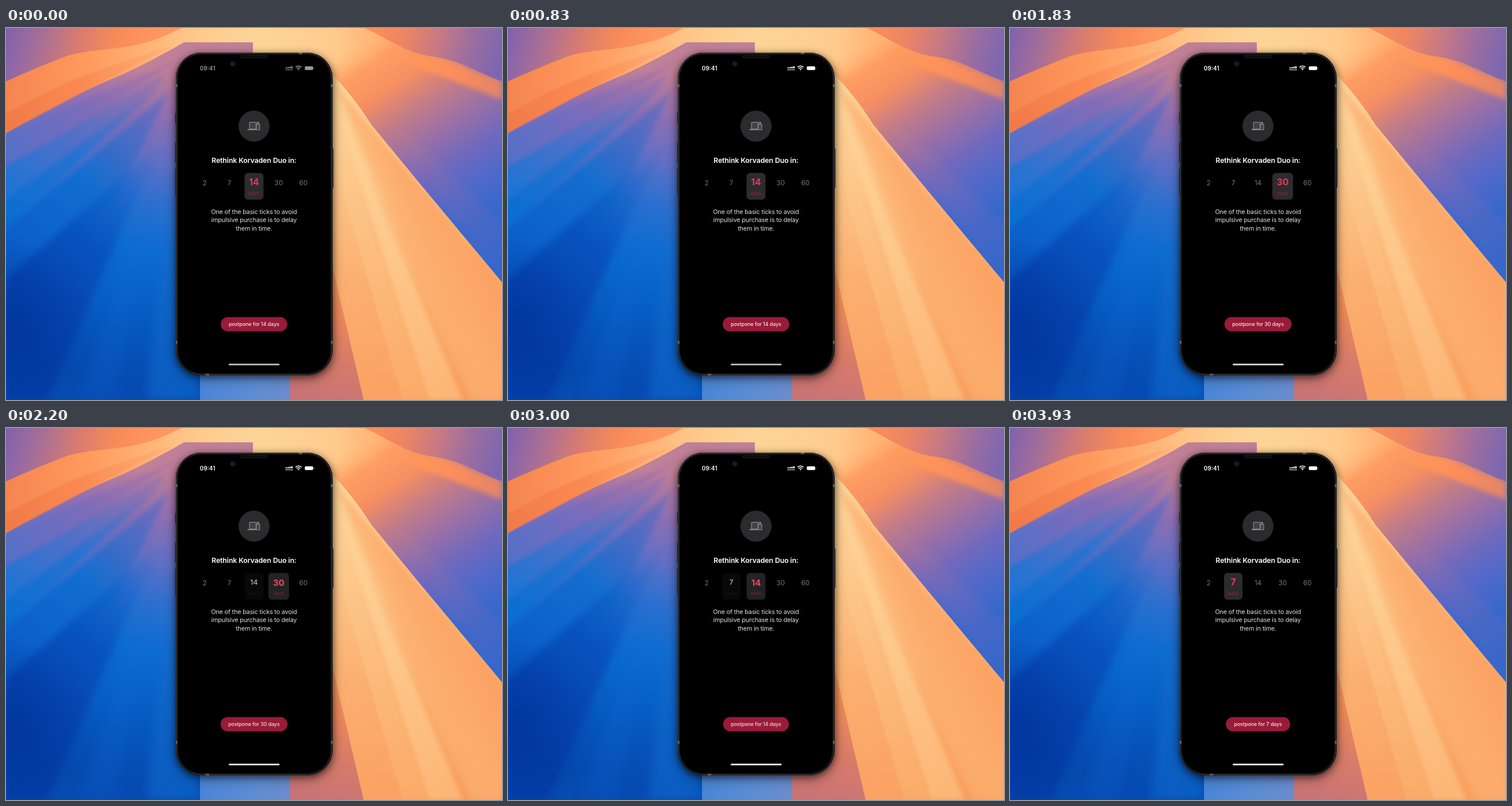
Recreate the animation shown at these times as an HTML page with a canvas. Size 864 by 648 pixels, loop 3960 ms.

```html
<!DOCTYPE html>
<html lang="en">
<head>
<meta charset="utf-8">
<title>Postpone picker</title>
<style>
html, body { margin: 0; width: 100%; height: 100%; overflow: hidden; background: #1560cc; }
canvas, svg { position: absolute; left: 0; top: 0; width: 864px; height: 648px; display: block; }
.phone { position: absolute; left: 296px; top: 43px; width: 272.5px; height: 562px; border-radius: 44px;
  background: #000; box-shadow: 0 3px 12px 1px rgba(0,0,0,.5), 0 8px 22px rgba(0,0,0,.25); }
text { font-family: Inter, Roboto, sans-serif; text-anchor: middle; }
</style>
</head>
<body>
<canvas id="wall" width="864" height="648"></canvas>
<div class="phone"></div>
<svg viewBox="0 0 864 648">
  <g fill="none">
    <rect x="296.5" y="43.5" width="271.5" height="561" rx="43.5" stroke="#111214" stroke-width="1"/>
    <rect x="297.4" y="44.4" width="269.7" height="559.2" rx="42.6" stroke="#56585a" stroke-width=".9"/>
    <rect x="299.4" y="46.4" width="265.7" height="555.2" rx="40.6" stroke="#161718" stroke-width="1"/>
  </g>
  <g fill="#2b2d38">
    <rect x="294.4" y="148" width="1.6" height="18"/><rect x="294.4" y="199" width="1.6" height="35"/>
    <rect x="294.4" y="245" width="1.6" height="46"/><rect x="568.5" y="210" width="2" height="68"/>
  </g>
  <g fill="#66686b">
    <rect x="296" y="98" width="2.5" height="5"/><rect x="566" y="98" width="2.5" height="5"/>
    <rect x="296" y="545" width="2.5" height="5"/><rect x="566" y="545" width="2.5" height="5"/>
    <rect x="510" y="43" width="6" height="2.4"/><rect x="348" y="602.4" width="6" height="2.4"/>
  </g>
  <rect x="408" y="48.2" width="48" height="3.6" rx="1.8" fill="#0a0a0b" stroke="#292a2c" stroke-width=".8"/>
  <circle cx="395" cy="62.5" r="4.6" fill="#17181c"/>
  <circle cx="394.5" cy="62.5" r="2.3" fill="#10121b" stroke="#2b3041" stroke-width=".9"/>

  <g id="status" fill="#fff">
    <text x="351" y="73.6" font-size="10" font-weight="600">09:41</text>
    <g id="signal"></g>
    <g fill="none" stroke="#fff" stroke-width="1.5">
      <path d="M504.3 68.3a7.4 7.4 0 0 1 10.4 0M506.3 70.5a4.5 4.5 0 0 1 6.4 0"/>
    </g>
    <path d="M507.9 72l1.6 1.9 1.6-1.9a2.3 2.3 0 0 0-3.2 0z"/>
    <rect x="520.5" y="66.7" width="14.5" height="6.6" rx="1.8"/>
    <rect x="536" y="68.8" width="1" height="2.4" rx=".5" opacity=".6"/>
  </g>

  <circle cx="432" cy="171" r="27" fill="#2b2b2d"/>
  <g fill="#434345" stroke="#8c8c8f" stroke-width="1.2">
    <path d="M424.2 176V165q0-.6.6-.6h15.4v2.8H435.6V176z"/>
    <path d="M420.8 177h14.4" stroke-width="1.9"/>
    <rect x="436" y="167.6" width="6" height="9.9" rx=".9"/>
  </g>

  <text x="432" y="235.3" font-size="12.4" font-weight="600" letter-spacing="-.14" fill="#fff">Rethink Korvaden Duo in:</text>
  <g id="picker"></g>
  <g font-size="10.9" letter-spacing="-.2" fill="#dededf">
    <text x="432" y="323.9">One of the basic ticks to avoid</text>
    <text x="432" y="338.4">impulsive purchase is to delay</text>
    <text x="432" y="352.9">them in time.</text>
  </g>
  <rect id="button" y="503.5" height="25" rx="12.5" fill="#981b39"/>
  <g id="labels" font-size="9.1" font-weight="500" letter-spacing="-.15" fill="#f3dfe4"></g>
  <rect id="home" x="388" y="584.8" width="88.5" height="2.8" rx="1.4" fill="#fff"/>
</svg>
<script>
const $ = id => document.getElementById(id);
const clamp = v => Math.max(0, Math.min(1, v));
const mix = (a, b, p) => a + (b - a) * p;

// Wallpaper: gradient-filled rays
const ctx = $('wall').getContext('2d');
function ray(path, [x1, y1, x2, y2], colors, blur = 0) {
  const g = ctx.createLinearGradient(x1, y1, x2, y2);
  colors.forEach((c, i) => g.addColorStop(i / (colors.length - 1), c));
  ctx.filter = blur ? `blur(${blur}px)` : 'none';
  ctx.fillStyle = g;
  ctx.fill(new Path2D(path));
}
function glow(x, y, r, color) {
  const g = ctx.createRadialGradient(x, y, 0, x, y, r);
  g.addColorStop(0, color);
  g.addColorStop(1, color.slice(0, 7) + '00');
  ctx.filter = 'none';
  ctx.fillStyle = g;
  ctx.fillRect(x - r, y - r, 2 * r, 2 * r);
}
function paintWall() {
  // top glow and the two orange wings
  ray('M0 0H864V648H0Z', [0, 0, 864, 0], ['#f4854f', '#ff9a5e', '#ffbd80', '#fdd294', '#ffc88a', '#ff985a', '#f98a55']);
  glow(440, 0, 170, '#fdd698b0');

  // left blue field
  ctx.save();
  ctx.clip(new Path2D('M0 183C70 139 140 107 205 80Q258 55 310 25H430V648H0Z'));
  ray('M0 0H430V648H0Z', [250, 75, 140, 600],
    ['#c08098', '#8d6fb4', '#5f70c6', '#2a70d0', '#0d6cd0', '#0762c8', '#0655bb', '#064bb0']);
  ray('M300 55L0 186V243L120 178Z', [0, 220, 280, 70], ['#5570c8', '#7d6cba', '#b4769f'], 3);
  ray('M285 75L0 243V300L170 205Z', [0, 270, 280, 80], ['#1f74d4', '#5c70c4', '#a874a8'], 3);
  ray('M280 90L0 300V350Z', [0, 320, 270, 110], ['#0a6fd0', '#2a72d0', '#8b6eb4'], 4);
  ray('M285 110L0 350V437L190 300Z', [0, 400, 270, 130], ['#0a5dc6', '#126dd0', '#746cba'], 4);
  ray('M270 200L0 437V648H70Z', [0, 520, 270, 220], ['#053ea7', '#0852bd', '#126bcf00'], 6);
  ray('M275 190L190 648H130Z', [0, 200, 0, 648], ['#1a70d400', '#0e6bd050', '#0a5bc450'], 8);
  ray('M300 140L338 648H245Z', [0, 140, 0, 648], ['#6a6bb800', '#206cca60', '#0d69cea0'], 8);
  glow(0, 520, 160, '#00309aa0');
  ctx.restore();

  // upper left corner and lower edge of the wing
  ray('M0 0H306Q278 14 255 22C195 40 150 36 108 48Q50 70 0 93Z', [0, 10, 245, 70],
    ['#8062ae', '#a96f95', '#d97c70', '#f88b58', '#ff9760']);
  ray('M0 150Q70 108 150 78T290 32Q180 86 0 183Z', [0, 160, 270, 45], ['#f17b48', '#fb8a51', '#ffad73'], 1);

  // right violet field
  ctx.save();
  ctx.clip(new Path2D('M864 93C815 75 790 56 745 50C695 44 665 18 625 0H540V180L864 500Z'));
  ray('M540 0H864V500H540Z', [585, 30, 800, 350],
    ['#ffcb8c00', '#ff9f62', '#f58e62', '#c27c88', '#9a70a6', '#7069be', '#4f69ca', '#3768cc']);
  ray('M640 20Q700 50 745 50L864 93V125Q750 80 640 40Z', [650, 30, 864, 110], ['#ff9b5d00', '#ff955b', '#f98d5b', '#e08468'], 4);
  ray('M600 85L864 340V443Z', [640, 160, 864, 400], ['#e1887300', '#8c6bad40', '#3966cb90'], 6);
  ctx.restore();

  // upper right corner
  ray('M625 0H864V93C815 75 790 56 745 50C695 44 665 18 625 0Z', [635, 0, 860, 60],
    ['#fb9059', '#ef8562', '#c97a82', '#9d6e9f', '#7c66b2']);

  // lower right beam
  ctx.save();
  ctx.clip(new Path2D('M548 60Q600 110 636 168L720 270L864 443V648H495V590H555Z'));
  ray('M480 50H864V648H480Z', [580, 90, 760, 648], ['#fdd498', '#fdca8e', '#fcb97b', '#fcac6b', '#f99f5e']);
  ray('M574 100L864 443V648H810Z', [640, 400, 820, 320], ['#fcb57600', '#fbac6d', '#fc9f60'], 5);
  ray('M570 115L795 648H735Z', [570, 140, 760, 648], ['#fdd598', '#fdc88b', '#fcb676'], 4);
  ray('M568 150L735 648H690L568 250Z', [570, 150, 700, 648], ['#fdd295', '#fcbc7e', '#fbab69'], 3);
  ray('M565 370L623 648H495V560Z', [590, 400, 530, 648], ['#f9a066', '#ef8b59', '#d87c68', '#c97377']);
  ray('M566 210L690 648H623L565 400Z', [570, 240, 650, 648], ['#fdc98b', '#fbaf70', '#fba163']);
  ctx.restore();

  // strip under the phone
  ray('M338 590H495V648H338Z', [338, 0, 495, 0], ['#4886d6', '#5a8cd5', '#6b8ccd']);
}
paintWall();

// Screen content
function add(parent, tag, attrs, label) {
  const el = document.createElementNS('http://www.w3.org/2000/svg', tag);
  for (const k in attrs) el.setAttribute(k, attrs[k]);
  if (label) el.textContent = label;
  return parent.appendChild(el);
}
for (let i = 0; i < 4; i++) {
  const x = 487 + i * 3.3, h = 2 + i * .7;
  add($('signal'), 'rect', { x, y: 70.6 - h, width: 2.3, height: h, rx: .5 });
  add($('signal'), 'rect', { x, y: 71.9, width: 2.3, height: 1.6, rx: .5 });
}

const options = [[2, 32], [7, 32], [14, 33], [30, 36], [60, 36]].map(([days, width], i) => {
  const x = 346 + i * 43, g = $('picker');
  return {
    box: add(g, 'rect', { x: x - width / 2, y: 252.5, width, height: 46.5, rx: 6, fill: '#2c2c2e' }),
    unit: add(g, 'text', { x, y: 291.2, 'font-size': 6.4, 'letter-spacing': .25, fill: '#b8203f' }, 'DAYS'),
    num: add(g, 'text', { x }, days),
    label: add($('labels'), 'text', { x: 432, y: 519.2 }, `postpone for ${days} days`),
    wide: { 7: 112, 14: 116, 30: 117 }[days] || 112
  };
});

const tones = [[0, 119, 119, 123], [.2, 190, 178, 184], [.55, 224, 126, 136], [.8, 230, 75, 95], [1, 240, 47, 86]];
function tone(p) {
  const i = Math.max(1, tones.findIndex(t => p <= t[0]));
  const a = tones[i - 1], b = tones[i], q = (p - a[0]) / (b[0] - a[0]);
  return `rgb(${[1, 2, 3].map(k => Math.round(mix(a[k], b[k], q)))})`;
}

// start time, from option, to option
const moves = [[1230, 2, 3], [2150, 3, 2], [2950, 2, 1]];
const FADE = 260, LOOP = 3960;

function draw(t) {
  let u = 1, from = 2, to = 2;
  for (const [start, a, b] of moves)
    if (t >= start) { u = clamp((t - start) / FADE); from = a; to = b; }
  // the numbers of a running change: the chosen one fades out while the next fades in
  const still = from === to;
  const level = (i, v) => i === to ? (still ? 1 : v) : i === from ? 1 - v : 0;
  const swap = clamp((u - .1) / .7), shift = clamp(u * 4);

  options.forEach((o, i) => {
    const p = level(i, u), size = mix(11.5, 16, p);
    o.box.setAttribute('opacity', p);
    o.unit.setAttribute('opacity', p);
    o.num.setAttribute('y', 269.7 - 1.5 * level(i, shift) + size * .364);
    o.num.setAttribute('font-size', size);
    o.num.setAttribute('font-weight', Math.round(mix(400, 700, clamp(p * 2))));
    o.num.setAttribute('fill', tone(p));
    o.label.setAttribute('opacity', level(i, swap));
  });

  const w = mix(options[from].wide, options[to].wide, clamp(u / .6));
  $('button').setAttribute('x', 432 - w / 2);
  $('button').setAttribute('width', w);
  $('status').setAttribute('opacity', mix(.6, 1, clamp(t / 240)));
  $('home').setAttribute('opacity', mix(.76, 1, clamp((t - 900) / 1800)));
}

function tick() {
  draw(performance.now() % LOOP);
  requestAnimationFrame(tick);
}
tick();
</script>
</body>
</html>
```
